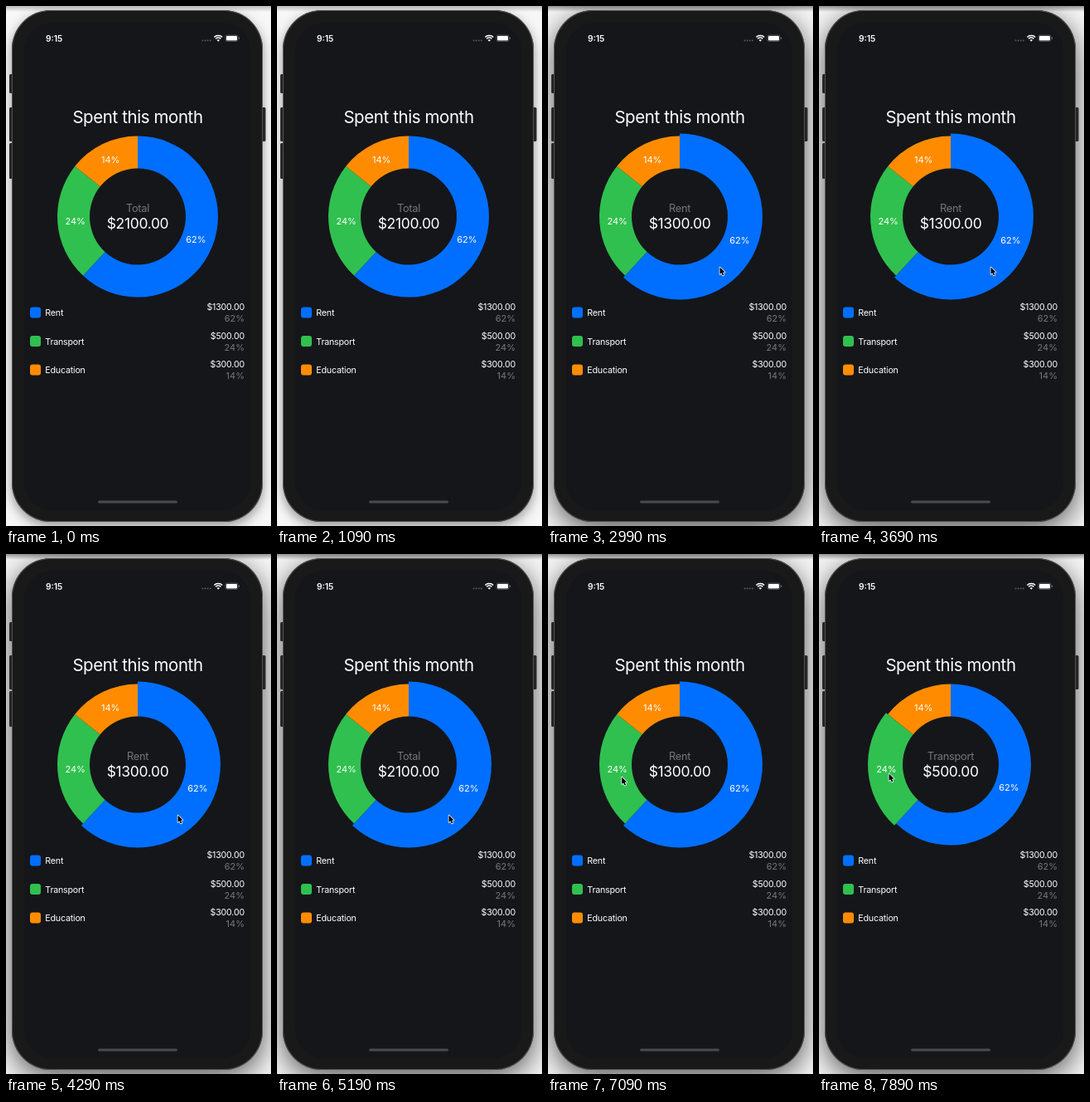
Recreate the animation shown at these times as an HTML page with a canvas. Size 320 by 626 pixels, loop 7.99 s.

```html
<!DOCTYPE html>
<html lang="en">
<head>
<meta charset="utf-8">
<title>Spent this month</title>
<style>
  html, body { margin: 0; width: 100%; height: 100%; overflow: hidden; background: #f5f5f5; }
  canvas { display: block; width: 320px; height: 626px; }
</style>
</head>
<body>
<canvas id="stage"></canvas>
<script>
const canvas = document.getElementById('stage');
const ctx = canvas.getContext('2d');
const scale = window.devicePixelRatio || 1;
canvas.width = 320 * scale;
canvas.height = 626 * scale;

const LOOP = 7990, FOCUS_TIME = 2390;
const CENTER = { x: 159, y: 253.5 };
const INNER = 58, OUTER = 97, LABEL_RADIUS = 75.6;
const GREY = '#76777b', WHITE = '#fff';

const items = [
  { name: 'Rent', amount: 1300, color: '#006fff' },
  { name: 'Transport', amount: 500, color: '#30c04f' },
  { name: 'Education', amount: 300, color: '#ff8c00' }
];
const total = items.reduce((sum, item) => sum + item.amount, 0);

// Selected slice over time; -1 shows the total.
const selections = [[0, -1], [FOCUS_TIME, 0], [5190, -1], [5990, 0], [7290, 1]];

// Pointer glides: start, end, from, to.
const glides = [
  { start: 1490, end: 1890, from: [322, 420], to: [207, 314] },
  { start: 5390, end: 5890, from: [207, 314], to: [147, 319.5] },
  { start: 6590, end: 7190, from: [147, 319.5], to: [84, 264] }
];

const clamp = v => Math.max(0, Math.min(1, v));
const easeOut = v => 1 - (1 - clamp(v)) ** 3;
const easeInOut = v => { v = clamp(v); return v * v * (3 - 2 * v); };
const money = v => '$' + v.toFixed(2);
const percent = v => Math.round(v / total * 100) + '%';

function box(x, y, w, h, r, fill) {
  ctx.beginPath();
  ctx.roundRect(x, y, w, h, r);
  ctx.fillStyle = fill;
  ctx.fill();
}

function text(str, x, y, size, { color = WHITE, align = 'left', weight = 400, spacing = -0.02 } = {}) {
  ctx.font = `${weight} ${size}px Inter, sans-serif`;
  ctx.letterSpacing = `${size * spacing}px`;
  ctx.textAlign = align;
  ctx.fillStyle = color;
  ctx.fillText(str, x, y);
}

function selectionAt(time) {
  return selections.filter(([start]) => start <= time).pop()[1];
}

function expansion(index, time) {
  let value = 0;
  for (const [start, selected] of selections) {
    if (start > time) break;
    const goal = selected === index ? 1 : 0;
    value += (goal - value) * easeOut((time - start) / 300);
  }
  return value;
}

function drawPhone(active) {
  ctx.fillStyle = '#f7f7f7';
  ctx.fillRect(0, 0, 320, 626);

  const strip = ctx.createLinearGradient(0, 0, 0, 7);
  strip.addColorStop(0, active ? 'rgba(0,0,0,.4)' : 'rgba(0,0,0,.25)');
  strip.addColorStop(1, 'rgba(0,0,0,0)');
  ctx.fillStyle = strip;
  ctx.fillRect(0, 0, 320, 7);

  ctx.save();
  ctx.shadowColor = active ? 'rgba(0,0,0,.65)' : 'rgba(0,0,0,.4)';
  ctx.shadowBlur = (active ? 34 : 14) * scale;
  ctx.shadowOffsetY = (active ? 9 : 5) * scale;
  box(7, 5, 303, 616, 47, '#19191a');
  ctx.restore();

  for (const [x, y, h] of [[4, 82, 23], [4, 122, 41], [4, 165, 43], [309, 122, 41]])
    box(x, y, 4.5, h, 1.5, '#252526');

  box(7, 5, 303, 616, 47, '#505052');
  box(8, 6, 301, 614, 46, '#19191a');
  box(22, 20, 273, 587, 34, '#15161a');
  box(111, 595.5, 96, 3, 1.5, '#4b4b4e');
}

function drawStatusBar() {
  text('9:15', 48, 42.5, 10.2, { weight: 600, spacing: 0 });
  for (let i = 0; i < 4; i++) box(236.5 + i * 3.1, 40.5, 2, 2, 1, '#58595c');

  ctx.strokeStyle = ctx.fillStyle = WHITE;
  ctx.lineWidth = 1.5;
  for (const r of [7, 4.4]) {
    ctx.beginPath();
    ctx.arc(256.3, 42.5, r, -Math.PI * 0.75, -Math.PI * 0.25);
    ctx.stroke();
  }
  ctx.beginPath();
  ctx.moveTo(256.3, 42.8);
  ctx.arc(256.3, 42.8, 2.5, -Math.PI * 0.75, -Math.PI * 0.25);
  ctx.fill();

  ctx.beginPath();
  ctx.roundRect(265, 35, 15, 7.5, 2);
  ctx.lineWidth = 0.6;
  ctx.strokeStyle = '#77777a';
  ctx.stroke();
  box(266, 36, 13, 5.5, 1.2, WHITE);
  box(281, 37.5, 1, 2.5, 0.5, '#77777a');
}

function drawChart(time) {
  let start = -Math.PI / 2;
  items.forEach((item, i) => {
    const end = start + item.amount / total * Math.PI * 2;
    const grow = expansion(i, time);
    ctx.beginPath();
    ctx.arc(CENTER.x, CENTER.y, OUTER + 3 * grow, start, end);
    ctx.arc(CENTER.x, CENTER.y, INNER, end, start, true);
    ctx.closePath();
    ctx.fillStyle = item.color;
    ctx.fill();

    const middle = (start + end) / 2, r = LABEL_RADIUS + 2.2 * grow;
    text(percent(item.amount), CENTER.x + r * Math.cos(middle), CENTER.y + r * Math.sin(middle) + 4,
      11, { align: 'center', spacing: 0 });
    start = end;
  });

  const { name, amount } = items[selectionAt(time)] || { name: 'Total', amount: total };
  text(name, CENTER.x, 247.5, 12.8, { color: GREY, align: 'center' });
  text(money(amount), CENTER.x, 268.3, 17.5, { align: 'center' });
}

function drawLegend() {
  items.forEach(({ name, amount, color }, i) => {
    const y = 369 + i * 34.5;
    box(29, y - 6.5, 13, 13, 3, color);
    text(name, 47.3, y + 4, 10.7);
    text(money(amount), 288, y - 2.6, 10.7, { align: 'right' });
    text(percent(amount), 288, y + 11, 11, { color: GREY, align: 'right', spacing: 0 });
  });
}

function drawPointer(time) {
  const glide = glides.filter(g => g.start <= time).pop();
  if (!glide) return;
  const p = easeInOut((time - glide.start) / (glide.end - glide.start));
  const [x, y] = glide.from.map((from, i) => from + (glide.to[i] - from) * p);
  ctx.save();
  ctx.translate(x, y);
  ctx.beginPath();
  for (const point of [[0.5, 0.5], [0.5, 9], [2.4, 7.3], [3.8, 10.5], [5.4, 9.8], [4, 6.7], [6.6, 6.6]])
    ctx.lineTo(...point);
  ctx.closePath();
  ctx.lineJoin = 'round';
  ctx.lineWidth = 1.5;
  ctx.strokeStyle = WHITE;
  ctx.stroke();
  ctx.fillStyle = '#000';
  ctx.fill();
  ctx.restore();
}

function draw(now) {
  // The picture advances in 100 ms steps, after a first step of 90 ms.
  const elapsed = now % LOOP;
  const time = elapsed < 90 ? 0 : Math.floor((elapsed - 90) / 100) * 100 + 90;
  ctx.setTransform(scale, 0, 0, scale, 0, 0);
  drawPhone(time >= FOCUS_TIME);
  drawStatusBar();
  text('Spent this month', CENTER.x, 140.6, 20.5, { align: 'center' });
  drawChart(time);
  drawLegend();
  drawPointer(time);
}

let origin;
function tick(now) {
  origin ??= now;
  draw(now - origin);
  requestAnimationFrame(tick);
}
requestAnimationFrame(tick);
</script>
</body>
</html>
```
